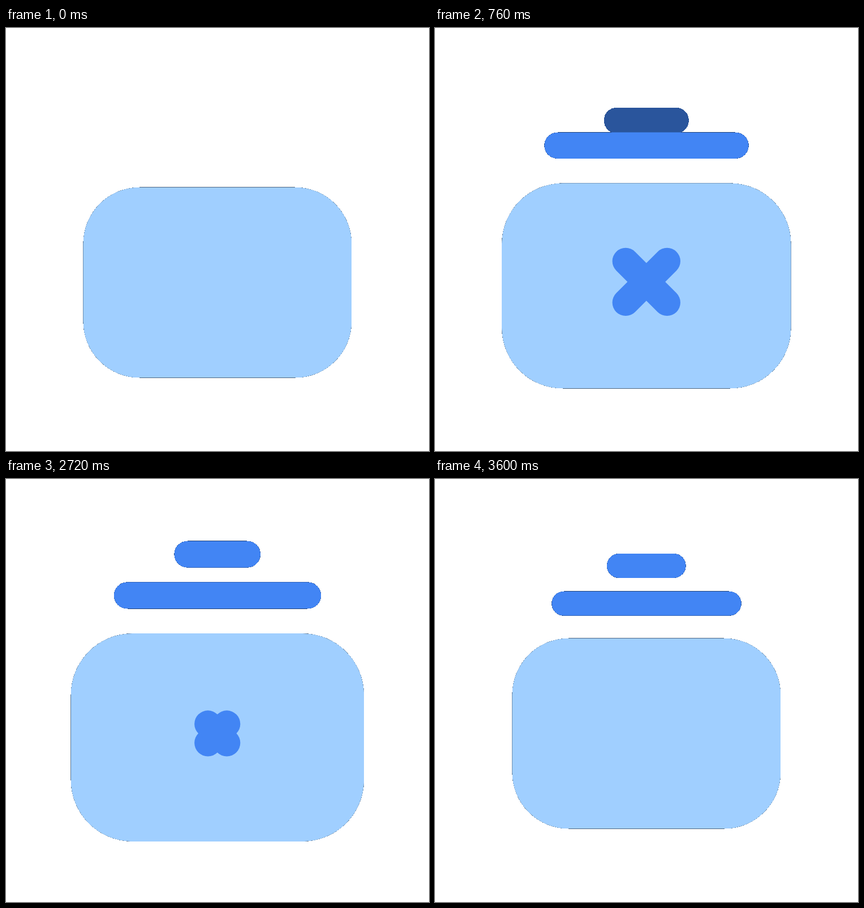
Write an HTML page with a canvas that moves like this. It is 748 px wide and 748 px high and loops after 3.64 s.

```html
<!DOCTYPE html>
<html lang="en">
<head>
<meta charset="utf-8">
<title>Archive icon</title>
<style>
  html, body { margin: 0; width: 100%; height: 100%; overflow: hidden; background: #fff; }
  canvas { display: block; width: 748px; height: 748px; }
</style>
</head>
<body>
<canvas id="stage" width="748" height="748"></canvas>
<script>
const SIZE = 748, CENTER = SIZE / 2, LOOP = 3640, STEP = 40;
const PALE = '#a0cfff', BLUE = '#4285f4';
const ctx = document.getElementById('stage').getContext('2d', { willReadFrequently: true });

const ramp = (t, from, to) => Math.min(1, Math.max(0, (t - from) / (to - from)));
const ease = (t, from, to) => {
  const u = ramp(t, from, to);
  return u * u * (3 - 2 * u);
};

// Bars rise past their resting place, then settle back.
const OVERSHOOT = 2.8, TRAVEL = 65.6;
function rise(t, start, settled) {
  const peak = start + 300;
  return t < peak
    ? TRAVEL - (TRAVEL + OVERSHOOT) * ease(t, start, peak)
    : -OVERSHOOT * (1 - ease(t, peak, settled));
}

function box(x, y, w, h, r, color) {
  ctx.fillStyle = color;
  ctx.beginPath();
  ctx.roundRect(x, y, w, h, r);
  ctx.fill();
}

function bar(t, x, y, w, start, settled) {
  ctx.globalAlpha = ramp(t, start, start + 250);
  box(x, y + rise(t, start, settled), w, 48.2, 24.1, BLUE);
  ctx.globalAlpha = 1;
}

function cross(arm) {
  if (arm <= 0) return;
  const x = 373.75, y = 451.25;
  ctx.strokeStyle = BLUE;
  ctx.lineWidth = 48.6;
  ctx.lineCap = 'round';
  for (const side of [-1, 1]) {
    ctx.beginPath();
    ctx.moveTo(x - arm, y - arm * side);
    ctx.lineTo(x + arm, y + arm * side);
    ctx.stroke();
  }
}

// One-bit transparency: faint pixels drop out, the rest are matted on black.
function hardenAlpha() {
  const image = ctx.getImageData(0, 0, SIZE, SIZE), px = image.data;
  for (let i = 0; i < px.length; i += 4) {
    const a = px[i + 3];
    if (a === 255 || a === 0) continue;
    if (a < 128) {
      px[i + 3] = 0;
    } else {
      for (let c = i; c < i + 3; c++) px[c] *= a / 255;
      px[i + 3] = 255;
    }
  }
  ctx.putImageData(image, 0, 0);
}

function draw(t) {
  const scale = 0.9 + 0.1 * (ease(t, 0, 1200) - ease(t, 2405, 3600));
  const spread = ease(t, 0, 600) - ease(t, 2400, 3000);

  ctx.clearRect(0, 0, SIZE, SIZE);
  ctx.save();
  ctx.translate(CENTER, CENTER);
  ctx.scale(scale, scale);
  ctx.translate(-CENTER, -CENTER);
  bar(t, 296, 104.8, 155.5, 600, 1200);
  bar(t, 187.5, 178.9, 373, 200, 850);
  box(109.9, 271.2, 527.9, 374.6, 111, PALE);
  cross(37.75 * spread);
  ctx.restore();
  hardenAlpha();
}

const begin = performance.now();
let shown = -1;
function tick() {
  const t = Math.floor((performance.now() - begin) % LOOP / STEP) * STEP;
  if (t !== shown) draw(shown = t);
  requestAnimationFrame(tick);
}
tick();
</script>
</body>
</html>
```
